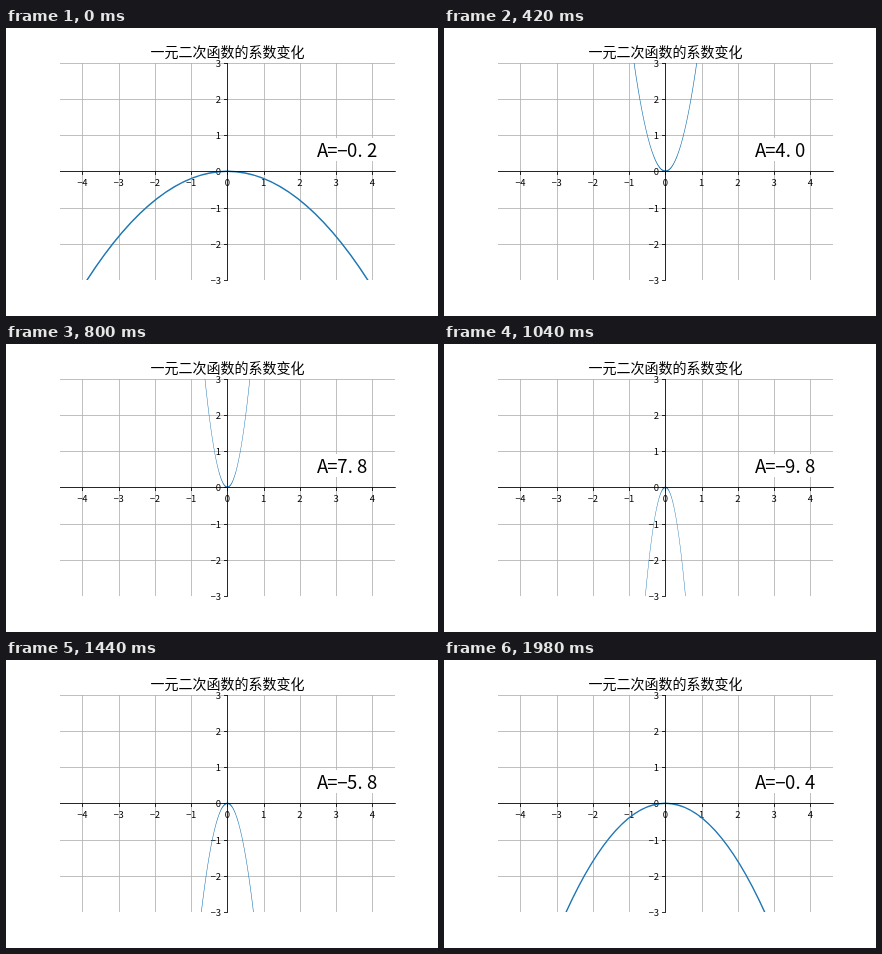
An HTML page with a canvas for the animation above (2 s loop, 432x288 px).

```html
<!DOCTYPE html>
<html lang="zh">
<head>
<meta charset="utf-8">
<title>一元二次函数</title>
<style>
html, body { margin: 0; width: 100%; height: 100%; overflow: hidden; background: #fff; }
canvas { display: block; width: 432px; height: 288px; }
</style>
</head>
<body>
<canvas id="plot" width="432" height="288"></canvas>
<script>
const ctx = document.getElementById('plot').getContext('2d');
const CJK = '"Noto Sans CJK SC", "Noto Sans CJK", sans-serif';
const LATIN = '"Liberation Sans", sans-serif';
const UNIT = 36.24, CX = 221.4, CY = 143.28;
const LEFT = 54, RIGHT = 389, TOP = 35, BOTTOM = 252;
const STEP = 20, COUNT = 100;

const px = x => CX + x * UNIT;
const py = y => CY - y * UNIT;
const snap = v => Math.floor(v + 0.5) + 0.5;

function line(x1, y1, x2, y2, color) {
  ctx.strokeStyle = color;
  ctx.lineWidth = 0.8;
  ctx.beginPath();
  ctx.moveTo(x1, y1);
  ctx.lineTo(x2, y2);
  ctx.stroke();
}

// Monospaced text: every glyph is centred in its own cell.
function cells(str, x, y, size, pitch) {
  ctx.textAlign = 'center';
  [...str].forEach((c, i) => {
    ctx.font = size + 'px ' + (c === '−' ? LATIN : CJK);
    const shift = c === '.' ? -pitch * 0.2 : 0;
    ctx.fillText(c, x + (i + 0.5) * pitch + shift, y);
  });
}

function clipPlot() {
  ctx.beginPath();
  ctx.rect(LEFT, TOP, RIGHT - LEFT, BOTTOM - TOP);
  ctx.clip();
}

const label = n => (n < 0 ? '−' : '') + Math.abs(n);

function drawGrid() {
  ctx.save();
  clipPlot();
  for (let i = -4; i <= 4; i++) line(snap(px(i)), TOP, snap(px(i)), BOTTOM, '#b0b0b0');
  for (let i = -3; i <= 3; i++) line(LEFT, snap(py(i)), RIGHT, snap(py(i)), '#b0b0b0');
  ctx.restore();
}

function drawTicks() {
  const ax = snap(CX), ay = snap(CY);
  ctx.fillStyle = '#000';
  for (let i = -4; i <= 4; i++) {
    const x = snap(px(i)), s = label(i);
    line(x, ay, x, ay + 3.5, '#000');
    cells(s, px(i) - s.length * 2.5, 158, 9.5, 5);
  }
  for (let i = -3; i <= 3; i++) {
    const y = snap(py(i)), s = label(i);
    line(ax - 3.5, y, ax, y, '#000');
    cells(s, 214.8 - s.length * 5, y + 3.5, 9.5, 5);
  }
}

function drawCurve(a) {
  const h = 5, end = py(a * h * h);
  ctx.save();
  clipPlot();
  ctx.strokeStyle = '#1f77b4';
  ctx.lineWidth = 1.5;
  ctx.beginPath();
  ctx.moveTo(px(-h), end);
  ctx.quadraticCurveTo(CX, py(-a * h * h), px(h), end);
  ctx.stroke();
  ctx.restore();
}

function drawAxes() {
  line(LEFT, snap(CY), RIGHT + 0.8, snap(CY), '#000');
  line(snap(CX), TOP, snap(CX), BOTTOM + 0.8, '#000');
}

function drawValue(k) {
  const s = 'A=' + (k <= 0 ? '−' : '') + (Math.abs(k) / 5).toFixed(1);
  ctx.fillStyle = '#fff';
  ctx.fillRect(308, 110, s.length * 10 + 7, 23);
  ctx.fillStyle = '#000';
  cells(s, 311.6, 129, 18.5, 9.9);
}

function drawTitle() {
  ctx.fillStyle = '#000';
  ctx.textAlign = 'center';
  ctx.font = '14px ' + CJK;
  ctx.fillText('一元二次函数的系数变化', CX, 28.5);
}

function draw(t) {
  const tick = Math.floor(t / STEP) % COUNT;
  const k = tick > 51 ? tick - 1 - COUNT : tick - 1;
  ctx.fillStyle = '#fff';
  ctx.fillRect(0, 0, 432, 288);
  drawGrid();
  drawTicks();
  drawCurve(k / 5);
  drawAxes();
  drawTitle();
  drawValue(k);
}

const start = performance.now();
function loop() {
  draw(performance.now() - start);
  requestAnimationFrame(loop);
}
loop();
</script>
</body>
</html>
```
